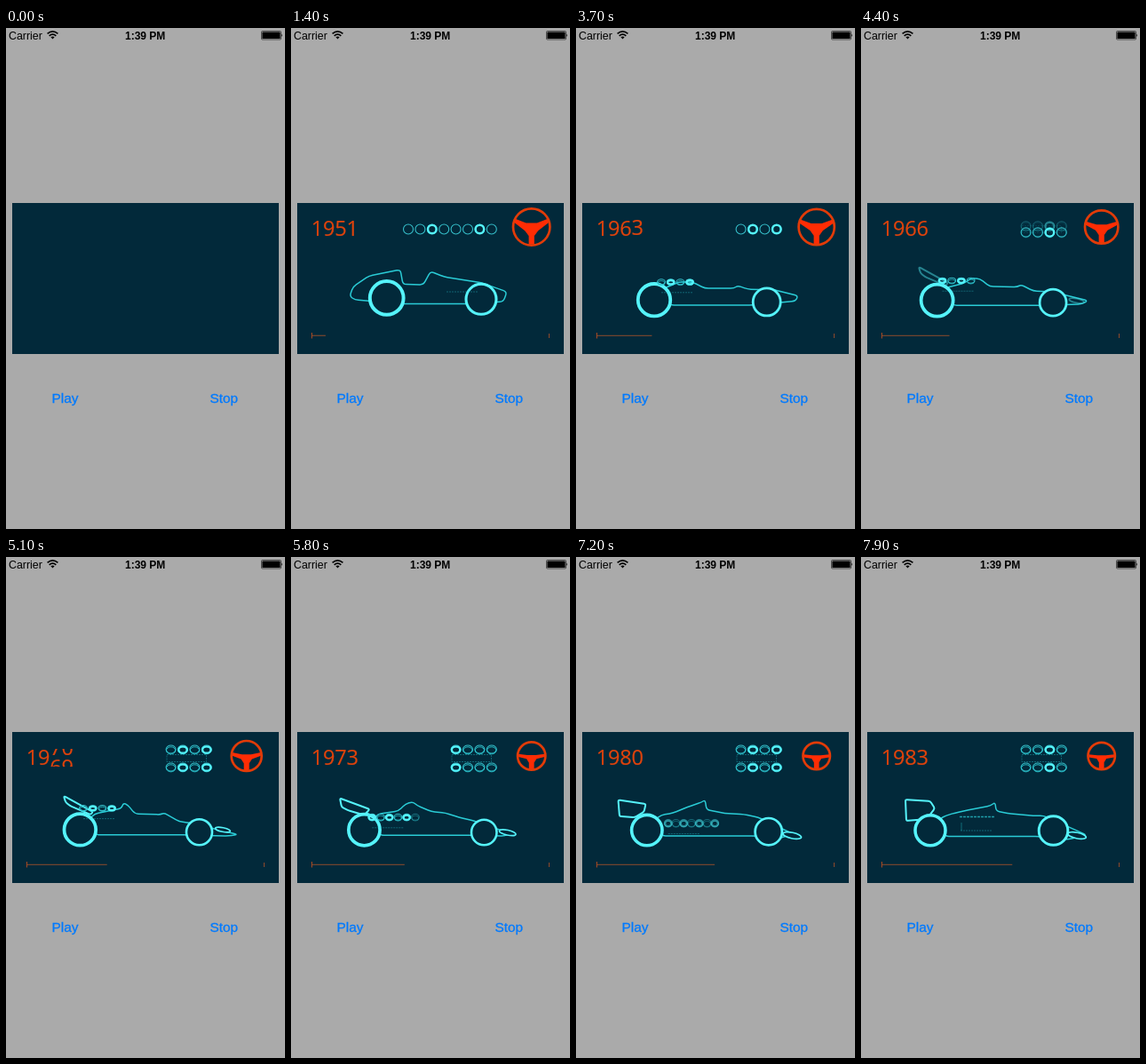
Write an HTML page with a canvas that moves like this. It is 314x564 px and loops after 8 s.

```html
<!DOCTYPE html>
<html lang="en">
<head>
<meta charset="utf-8">
<title>Racing car timeline</title>
<style>
html, body { margin: 0; width: 100%; height: 100%; overflow: hidden; background: #aaa; }
body { position: relative; font-family: "Liberation Sans", Arial, sans-serif; }
canvas, svg { position: absolute; left: 0; top: 0; width: 314px; height: 564px; }
.label { position: absolute; white-space: nowrap; line-height: 16px; font-size: 12.4px; color: #000; }
.button { font-size: 15.4px; line-height: 20px; color: #007aff; -webkit-text-stroke: .3px #007aff; }
#year { position: absolute; left: 22.5px; top: 215.5px; opacity: 0; color: #e0430c;
  font: 23.5px/24px "Open Sans", "Noto Sans", sans-serif; -webkit-text-stroke: .2px #e0430c; }
.cell { position: absolute; top: 0; width: 14px; height: 20px; overflow: hidden; text-align: center; }
.cell span { position: absolute; left: 0; top: -2.2px; width: 100%; }
</style>
</head>
<body>
<canvas id="art" width="314" height="564"></canvas>
<svg viewBox="0 0 314 564">
  <g fill="none" stroke="#000" stroke-width="1.7">
    <path d="M46.6 6.4Q52.5 1.2 58.4 6.4"/>
    <path d="M48.7 8.8Q52.5 5.4 56.3 8.8"/>
  </g>
  <path d="M50.4 10.2Q52.5 8.6 54.6 10.2L52.5 12.6Z"/>
  <rect x="287.5" y="3.5" width="22" height="9.5" rx="1" fill="none" stroke="#222" stroke-width=".7"/>
  <rect x="288.4" y="4.4" width="20.2" height="7.7" rx=".5"/>
  <path d="M310.3 6.5Q312 8.2 310.3 10Z"/>
</svg>
<div class="label" style="left:3px;top:1px">Carrier</div>
<div class="label" style="left:134px;top:1px;font-size:12px;font-weight:bold">1:39 PM</div>
<div class="label button" style="left:51.5px;top:406.5px">Play</div>
<div class="label button" style="left:229.5px;top:406.5px">Stop</div>
<div id="year"></div>
<script>
const LOOP = 8000, STEP = 100, FIRST = 1400, LAST = 7900;
const NAVY = '#02293a', CYAN = '#55f3fa', LINE = '#2accd6';
const ctx = document.getElementById('art').getContext('2d');

const clamp = v => Math.max(0, Math.min(1, v));
const ramp = (t, a, b) => clamp((t - a) / (b - a));
const ease = k => k * k * (3 - 2 * k);
const mix = (a, b, k) => Array.isArray(a) ? a.map((v, i) => mix(v, b[i], k)) : a + (b - a) * k;
const pts = s => s.split(' ').map(p => p.split(',').map(Number));

// outline from tail to nose; the underside, wheel heights and widths follow by rule
const lowWing = '65,269 98,287 95,290 72,280 67,276';
const car = (t, wheels, engine, body, wing = lowWing) =>
  ({ t, parts: [wheels, engine, pts(body), pts(wing)] });

// wheels: rear x, front x, front radius; engine: x, y, cylinders
const cars = [
  car(1400, [107.7, 214, 17], [175, 285, 5],
    '72,306 66,302 70,291 88,279 123,272 126,288.5 149,289 157,274 172,280 215,287 243,297 239,308'),
  car(2600, [95.5, 208, 16.8], [154.5, 289.5, 5],
    '77,307 71,299 84,282 103,272 119,273 121,288.5 139,289 151,282 200,283 207,287 237,299 234,308'),
  car(3700, [88, 214.7, 15.5], [96, 285.8, 4],
    '90,306 91,296 104,291 116,286 131,286 145,293 178,293 182,290 193,294 224,295 250,301.5 247,307.5'),
  car(5100, [83.3, 217.5, 14.5], [87, 282.6, 4],
    '92,297 100,289 130,283 132,277 137,279 145,289 174,290 178,288 195,298 206,299 261,312.5 250,314'),
  car(6500, [81.6, 217, 14], [95.5, 303, 7],
    '90,296 96,290 112,288.5 126,279 137,272 139.5,271 142,283 170,288.5 183,288 205,295 233,310 231,314',
    '45,274 79,281 70,291 58,291 47,287'),
  car(7900, [78, 216.5, 16.3], [112, 296, 7],
    '88,295 96,291 106,288 125,284 146,280 151,276 152,286 165,288.5 195,291.5 205,291 254,313 233,318',
    '50,273 78,275 83,283 74,295 51,297')
];

function partsAt(t) {
  const i = cars.findIndex((c, n) => n === cars.length - 2 || t < cars[n + 1].t);
  const a = cars[i], b = cars[i + 1];
  return mix(a.parts, b.parts, ramp(t, a.t, b.t));
}

function stroke(color, width) {
  ctx.strokeStyle = color;
  ctx.lineWidth = width;
  ctx.stroke();
}

// closed outline with corners rounded by at most `round` pixels
function outline(points, color, width, round = 4) {
  const toward = (p, q) => mix(p, q, Math.min(.5, round / (Math.hypot(q[0] - p[0], q[1] - p[1]) || 1)));
  ctx.beginPath();
  points.forEach((p, i) => {
    const before = points.at(i - 1), after = points[(i + 1) % points.length];
    ctx.lineTo(...toward(p, before));
    ctx.quadraticCurveTo(...p, ...toward(p, after));
  });
  ctx.closePath();
  stroke(color, width);
}

function segment(x1, y1, x2, y2, color, width = 1) {
  ctx.beginPath();
  ctx.moveTo(x1, y1);
  ctx.lineTo(x2, y2);
  stroke(color, width);
}

function ring(x, y, rx, ry, width, color, fill = 'transparent', tilt = 0) {
  ctx.beginPath();
  ctx.ellipse(x, y, rx, ry, tilt, 0, Math.PI * 2);
  ctx.fillStyle = fill;
  ctx.fill();
  stroke(color, width);
}

function faded(alpha, draw) {
  if (alpha <= 0) return;
  ctx.save();
  ctx.globalAlpha *= alpha;
  draw();
  ctx.restore();
}

// cylinders fire in groups that share the same square modulo 8
const group = [1, 1, 1, 0, 4];
const fires = (i, beat) => i * i % 8 === group[beat % 5];

// a thin cylinder with a piston ring that shifts inside it when seen at an angle
function cylinder(x, y, rx, ry, hot, depth) {
  ring(x, y, rx, ry, 1.1, '#35bdc8');
  if (depth > 0) faded(depth, () => ring(x, y + 1.3, rx - .4, ry - .5, .9, LINE));
  if (hot) ring(x, y + depth * .5, rx - .8, ry - .8, 2.3, CYAN);
}

function drawCar(t, beat) {
  const [[rearX, frontX, frontR], [ex, ey, count], body, wing] = partsAt(t);
  const p = ramp(t, FIRST, LAST);
  const rearR = 18.9 - 1.9 * p, ground = 324.8 - 2 * (1 - p) ** 4, under = 310.5 + 4 * p;
  const wings = ramp(t, 4000, 4900), noseDrop = ramp(t, 5100, 6500);

  outline([...body, [frontX - frontR, under], [rearX + rearR, under]], LINE, 1.5);
  faded(wings, () => {
    outline(wing, CYAN, 2, 2);
    ring(frontX + 26.5, 307 + 6.5 * noseDrop, 8.5 + 2 * noseDrop, 2.3 + noseDrop, 1.7, CYAN, NAVY, .2);
  });
  ring(rearX, ground - rearR, rearR, rearR, rearR * .21, CYAN, NAVY);
  ring(frontX, ground - .5 - frontR, frontR, frontR, frontR * .18, CYAN, NAVY);

  faded(.4, () => {
    ctx.setLineDash([2, 1]);
    segment(ex, ey + 12, ex + 36, ey + 12, LINE, .9);
  });
  const gap = 13.3 - .65 * count;
  for (let i = 0; i < count; i++) {
    const shown = ramp(t, 1500, 2400) * (1 - ramp(t, 6700, 7600)) * clamp(count - i);
    faded(shown, () => cylinder(ex + i * gap, ey, 4.4, 3 + noseDrop, (i + beat) % 2 === 0, .8));
  }
  faded(ramp(t, 7200, 7800) * .7, () => {
    segment(ex + 1, ey + 3, ex + 1, ey + 12, LINE, .6);
    ctx.setLineDash([3, 1]);
    segment(ex - 1, ey - 3.5, ex + 38, ey - 3.5, LINE, 1.4);
  });
}

function drawCylinders(t, beat) {
  const left = 1 - ramp(t, 2800, 3300), vee = ease(ramp(t, 4200, 4700));
  for (let i = 0; i < 8; i++) {
    const second = i > 3;
    const x = 132 + 13.4 * (second ? i : mix(i, i + 4, vee > 0 ? 1 : 0));
    const y = 226.5 + vee * (second ? 10 : -10);
    faded(second ? 1 : Math.max(left, vee), () => cylinder(x, y, 5.5, 5.5 - vee, fires(i, beat), vee));
  }
  faded(vee * .4, () => {
    ctx.setLineDash([2, 1]);
    ctx.beginPath();
    ctx.rect(181, 222.5, 44.5, 8);
    stroke(LINE, .9);
  });
}

function drawSteering(t) {
  const k = ease(ramp(t, 3000, 6400));
  const r = mix(20.7, 15.2, k), rise = mix(.47, .12, k), w = mix(.15, .19, k);
  const half = [[.3, -rise * .45], [.95, -rise], [.95, -rise + .22], [.36, .2], [w, .48], [w, .96]];
  const mirror = half.map(([x, y]) => [-x, y]).reverse();
  ctx.beginPath();
  [...half, ...mirror].forEach(([x, y]) => ctx.lineTo(270.7 + x * r, 224 + y * r));
  ctx.fillStyle = '#ff2c04';
  ctx.fill();
  ring(270.7, 224, r, r, 2.7, '#e23b08');
}

function drawTimeline(t) {
  const end = 23 + Math.max(0, t - 610) * .0202;
  segment(23, 346.3, end, 346.3, '#71442f', 1.3);
  segment(23.5, 343, 23.5, 349.5, '#a84a20');
  segment(290.5, 344, 290.5, 349, '#8e4a2a');
}

const yearBox = document.getElementById('year');
const cells = [0, 1, 2, 3].map(i => {
  const cell = document.createElement('div');
  cell.className = 'cell';
  cell.style.left = i * 13.2 + 'px';
  cell.append(document.createElement('span'), document.createElement('span'));
  yearBox.append(cell);
  return cell;
});

function showYear(t, alpha) {
  const value = Math.max(1950, 1951.05 + (t - FIRST) * .00494);
  const year = Math.floor(value);
  const roll = ease(ramp(value - year, .22, .44));
  const now = String(year), next = String(year + 1);
  yearBox.style.opacity = alpha;
  cells.forEach((cell, i) => {
    const shift = now[i] === next[i] ? 0 : roll * 22;
    const [a, b] = cell.children;
    a.textContent = now[i];
    b.textContent = next[i];
    a.style.transform = `translateY(${shift}px)`;
    b.style.transform = `translateY(${shift - 22}px)`;
  });
}

function render(time) {
  const t = Math.floor((time % LOOP) / STEP) * STEP, beat = t / STEP;
  const alpha = ramp(t, 300, 800);
  ctx.clearRect(0, 0, 314, 564);
  ctx.fillStyle = NAVY;
  ctx.fillRect(7, 197, 300, 170);
  ctx.lineJoin = 'round';
  faded(alpha, () => {
    drawCar(t, beat);
    drawCylinders(t, beat);
    drawSteering(t);
    drawTimeline(t);
  });
  showYear(t, alpha);
}

const start = performance.now();
function tick() {
  render(performance.now() - start);
  requestAnimationFrame(tick);
}
tick();
</script>
</body>
</html>
```
